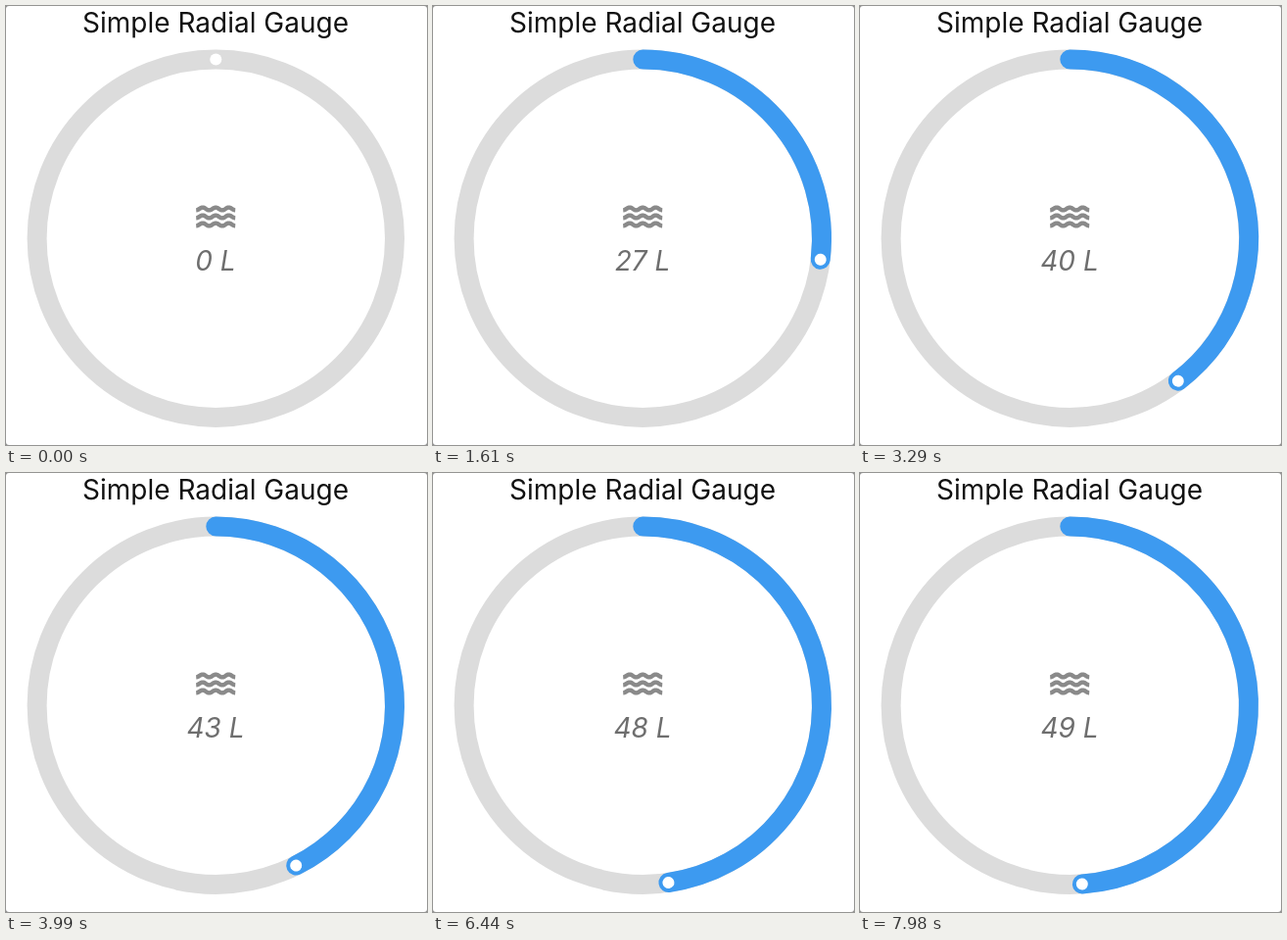
An HTML page that plays this animation: 430x448 px, repeating every 8000 ms.

```html
<!DOCTYPE html>
<html lang="en">
<head>
<meta charset="utf-8">
<title>Simple Radial Gauge</title>
<style>
  html, body { margin: 0; width: 100%; height: 100%; overflow: hidden; background: #8a8a8a; }
  svg { display: block; width: 430px; height: 448px; }
  text { font: 28px Inter, Roboto, sans-serif; text-anchor: middle; }
  .ring { fill: none; stroke-width: 20; }
  .track { stroke: #dcdcdc; }
  .fill { stroke: #3d9af0; stroke-linecap: round; }
  .waves { fill: none; stroke: #8a8a8a; stroke-width: 4.4; }
  .value { fill: #6e6e6e; font-style: italic; }
</style>
</head>
<body>
<svg viewBox="0 0 430 448">
  <rect width="430" height="448" rx="3" fill="#fff"/>
  <text x="214" y="27" fill="#111">Simple Radial Gauge</text>
  <g transform="translate(214.3 237.2)">
    <circle class="ring track" r="182.7"/>
    <path class="ring fill" id="arc"/>
    <circle id="knob" cy="-182.7" r="6" fill="#fff"/>
  </g>
  <path class="waves" id="waves"/>
  <text class="value" id="value" x="214" y="270">0 L</text>
</svg>
<script>
  const LOOP = 8000, STEP = 70, RADIUS = 182.7;
  const TARGET = 180, DECAY = 4.79e-4;
  const [arc, knob, waves, value] =
    ['arc', 'knob', 'waves', 'value'].map(id => document.getElementById(id));

  function wave(y) {
    const points = [];
    for (let x = -20; x <= 20; x += 0.5) {
      points.push(`${214.2 + x} ${(y - 1.4 * Math.cos(x * 0.15 * Math.PI)).toFixed(2)}`);
    }
    return 'M' + points.join('L');
  }
  waves.setAttribute('d', [207, 215, 223].map(wave).join(''));

  function render(time) {
    const t = Math.floor((time % LOOP) / STEP) * STEP;
    const angle = TARGET * (1 - Math.exp(-DECAY * t));
    const rad = angle * Math.PI / 180;
    const x = RADIUS * Math.sin(rad), y = -RADIUS * Math.cos(rad);

    arc.setAttribute('d', angle > 0
      ? `M0 ${-RADIUS}A${RADIUS} ${RADIUS} 0 0 1 ${x} ${y}` : '');
    knob.setAttribute('transform', `rotate(${angle})`);
    value.textContent = `${Math.round(angle / 3.6)} L`;
  }

  const start = performance.now();
  function tick() {
    render(performance.now() - start);
    requestAnimationFrame(tick);
  }
  tick();
</script>
</body>
</html>
```
